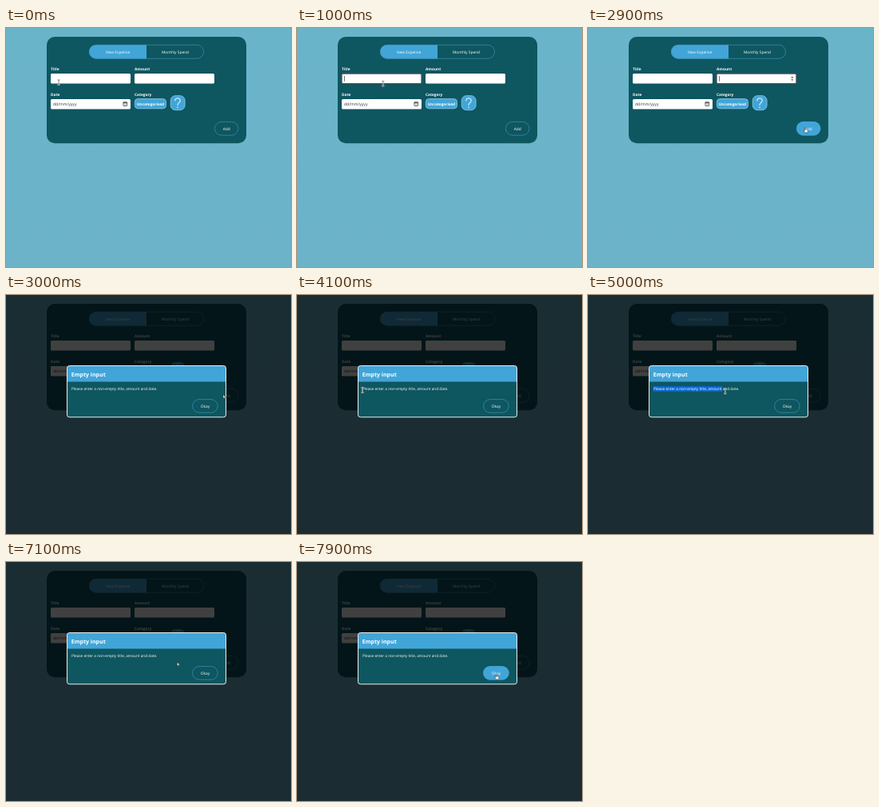
An HTML page that plays this animation: 357 by 299 pixels, repeating every 8000 ms.

```html
<!DOCTYPE html>
<html lang="en">
<head>
<meta charset="utf-8">
<title>Expense form</title>
<style>
  html, body { margin: 0; width: 100%; height: 100%; overflow: hidden; background: #6bb3c9; }
  svg { display: block; width: 357px; height: 299px; }
  text {
    font: 4.85px "Open Sans", "Noto Sans", sans-serif;
    fill: #fff;
    text-rendering: geometricPrecision;
  }
  .mid { text-anchor: middle; }
  .label { font-size: 4.75px; font-weight: 700; }
  .heading { font-size: 7px; font-weight: 700; }
  .message { font-size: 4.72px; }
  .hint { font-size: 5.05px; fill: #333; }
  .accent { fill: #42a5d8; }
  .field { fill: #fff; }
  .pill { fill: none; stroke: #3d93b4; stroke-width: .7; }
  .badge { fill: #42a5d8; stroke: #8fcdea; stroke-width: .8; }
  .ring { fill: #fff; stroke: #4b4e52; stroke-width: 1.3; }
  .caret { stroke: #222; stroke-width: .7; }

  /* Everything shares one 8 s loop; parts switch hard unless stepped below. */
  .on { opacity: 0; animation: 8s step-end infinite; }
  .title-focus { animation-name: title-focus; }
  .title-caret { animation-name: title-caret; }
  .amount-focus { animation-name: amount-focus; }
  .amount-caret { animation-name: amount-caret; }
  .add-hover { animation-name: add-hover; }
  .modal { animation-name: modal; }
  .okay-hover { animation-name: okay-hover; }
  .beam { animation-name: beam; }
  .arrow { animation-name: arrow; }
  .hand { animation-name: hand; }
  .selection { fill: #0b69d6; width: 0; animation: select 8s step-end infinite; }
  .pointer { animation: travel 8s step-end infinite; }

  @keyframes title-focus { 0% { opacity: 0 } 8.75% { opacity: 1 } 21.25%, 100% { opacity: 0 } }
  @keyframes title-caret { 0% { opacity: 0 } 8.75% { opacity: 1 } 15%, 100% { opacity: 0 } }
  @keyframes amount-focus { 0% { opacity: 0 } 21.25% { opacity: 1 } 37.5%, 100% { opacity: 0 } }
  @keyframes amount-caret {
    0%, 27.5% { opacity: 0 }
    21.25%, 33.75% { opacity: 1 }
    37.5%, 100% { opacity: 0 }
  }
  @keyframes add-hover { 0% { opacity: 0 } 33.75% { opacity: 1 } 37.5%, 100% { opacity: 0 } }
  @keyframes modal { 0% { opacity: 0 } 37.5%, 100% { opacity: 1 } }
  @keyframes okay-hover { 0% { opacity: 0 } 93.75%, 100% { opacity: 1 } }
  @keyframes beam {
    0%, 50% { opacity: 1 }
    25%, 70%, 100% { opacity: 0 }
  }
  @keyframes arrow {
    0%, 33.75%, 50%, 93.75%, 100% { opacity: 0 }
    25%, 37.5%, 70% { opacity: 1 }
  }
  @keyframes hand {
    0%, 37.5% { opacity: 0 }
    33.75%, 93.75%, 100% { opacity: 1 }
  }
  @keyframes select {
    0% { width: 0 }
    52.5% { width: 0; animation-timing-function: steps(9) }
    63.75% { width: 97px }
    65% { width: 107.6px }
    82.5%, 100% { width: 0 }
  }
  @keyframes travel {
    0% { transform: translate(66px, 68px); animation-timing-function: steps(2) }
    2.5% { transform: translate(82px, 69px) }
    11.25% { transform: translate(82px, 69px); animation-timing-function: steps(4) }
    16.25% { transform: translate(185px, 71px) }
    23.75% { transform: translate(185px, 71px); animation-timing-function: steps(5) }
    30% { transform: translate(255px, 112px); animation-timing-function: steps(4) }
    35% { transform: translate(272px, 124.5px) }
    40% { transform: translate(272px, 124.5px); animation-timing-function: steps(9) }
    51.25% { transform: translate(82px, 119px) }
    52.5% { transform: translate(82px, 119px); animation-timing-function: steps(9) }
    63.75% { transform: translate(183px, 120.5px); animation-timing-function: steps(9) }
    75% { transform: translate(196.5px, 118.5px); animation-timing-function: steps(2) }
    77.5% { transform: translate(197px, 118px) }
    85% { transform: translate(197px, 118px); animation-timing-function: steps(9) }
    96.25% { transform: translate(249px, 139.5px); animation-timing-function: steps(2) }
    98.75%, 100% { transform: translate(249.5px, 140.5px) }
  }
</style>
</head>
<body>
<svg viewBox="0 0 357 299">
  <defs>
    <linearGradient id="sky" x2="0" y2="1">
      <stop stop-color="#6ab4c9"/>
      <stop offset="1" stop-color="#6cb3ca"/>
    </linearGradient>
  </defs>
  <rect width="357" height="299" fill="url(#sky)"/>

  <rect x="51" y="11" width="250" height="133.3" rx="10" fill="#0e5660"/>

  <!-- Tabs -->
  <path class="accent" d="M176 21H112.7a8.7 8.7 0 0 0 0 17.4H176z"/>
  <rect class="pill" x="104.3" y="21.2" width="143.3" height="17" rx="8.5"/>
  <text class="mid" x="140" y="31.7">New Expense</text>
  <text class="mid" x="212" y="31.7">Monthly Spend</text>

  <!-- Fields -->
  <text class="label" x="56" y="53.3">Title</text>
  <text class="label" x="161" y="53.3">Amount</text>
  <text class="label" x="56" y="85">Date</text>
  <text class="label" x="161" y="85">Category</text>
  <rect class="field" x="56" y="57" width="100" height="12.5" rx="1.6"/>
  <rect class="field" x="161" y="57" width="100" height="12.5" rx="1.6"/>
  <rect class="field" x="56" y="89" width="100" height="12.5" rx="1.6"/>
  <text class="hint" x="59" y="97">dd/mm/yyyy</text>
  <g fill="none" stroke="#333" stroke-width=".7">
    <rect x="146.9" y="92.6" width="4.8" height="4.9" rx=".4"/>
    <path d="M146.9 93.8h4.8" stroke-width="1"/>
    <path d="M148 95.9h2.6" stroke-dasharray=".7 .3"/>
  </g>

  <g class="on title-focus"><rect class="ring" x="56" y="57" width="100" height="12.6" rx="1.4"/></g>
  <path class="on title-caret caret" d="M59.4 60v6.7"/>
  <g class="on amount-focus">
    <rect class="ring" x="161" y="57" width="100" height="12.6" rx="1.4"/>
    <path d="M254.2 62.4l1.6-1.9 1.6 1.9zM254.2 64.2l1.6 1.9 1.6-1.9z" fill="#555"/>
  </g>
  <path class="on amount-caret caret" d="M164.4 60v6.7"/>

  <!-- Category -->
  <rect class="badge" x="161.3" y="88.6" width="39.2" height="12.2" rx="4"/>
  <text class="label mid" x="180.9" y="96.6">Uncategorised</text>
  <rect class="badge" x="206.2" y="84.7" width="17.9" height="18" rx="6"/>
  <path d="M211.9 90.8c0-4 6.3-4 6.3 0 0 2.8-3.2 2.7-3.2 5.8" fill="none" stroke="#c4e6f6" stroke-width="1.3" stroke-linecap="round"/>
  <circle cx="215" cy="99.3" r=".9" fill="#c4e6f6"/>

  <!-- Add -->
  <rect class="pill" x="261.4" y="117.4" width="29.6" height="16.8" rx="8.4"/>
  <rect class="on add-hover accent" x="261" y="117" width="30.4" height="17.6" rx="8.8"/>
  <text class="mid" x="276.2" y="127.7">Add</text>

  <!-- Dialog -->
  <g class="on modal">
    <rect width="357" height="299" fill="#000" fill-opacity=".75"/>
    <rect x="76.5" y="88.5" width="199" height="64.3" rx="3" fill="#0e5660"/>
    <path class="accent" d="M76.5 108.6V91.5a3 3 0 0 1 3-3h193a3 3 0 0 1 3 3v17.1z"/>
    <rect x="76.5" y="88.5" width="199" height="64.3" rx="3" fill="none" stroke="#e4f1f5"/>
    <text class="heading" x="81.8" y="101.8">Empty input</text>
    <rect class="selection" x="82" y="114.2" height="6.6"/>
    <text class="message" x="82" y="119.1">Please enter a non-empty title, amount and date.</text>
    <rect class="pill" x="233.6" y="130.6" width="31.6" height="16.6" rx="8.3"/>
    <rect class="on okay-hover accent" x="233.2" y="130.2" width="32.4" height="17.4" rx="8.7"/>
    <text class="mid" x="249.4" y="140.8">Okay</text>
  </g>

  <!-- Pointer, drawn around its hot spot -->
  <g class="pointer">
    <g class="on beam" fill="none">
      <path d="M-1.5-3h3M0-3v6M-1.5 3h3" stroke="#fff" stroke-width="1.3"/>
      <path d="M-1.5-3h3M0-3v6M-1.5 3h3" stroke="#333" stroke-width=".6"/>
    </g>
    <path class="on arrow" d="M0 0v5l1.2-1 .8 1.8.9-.4-.8-1.7h1.5z" fill="#fff" stroke="#111" stroke-width=".5"/>
    <path class="on hand" d="M-.6.3q.7-.8 1.2 0v2.2l2.5.6q.7.3.5 1.2L3 6.6H.1L-1.9 4q0-.9.7-.7l.6.5z" fill="#fff" stroke="#111" stroke-width=".5"/>
  </g>
</svg>
</body>
</html>
```
